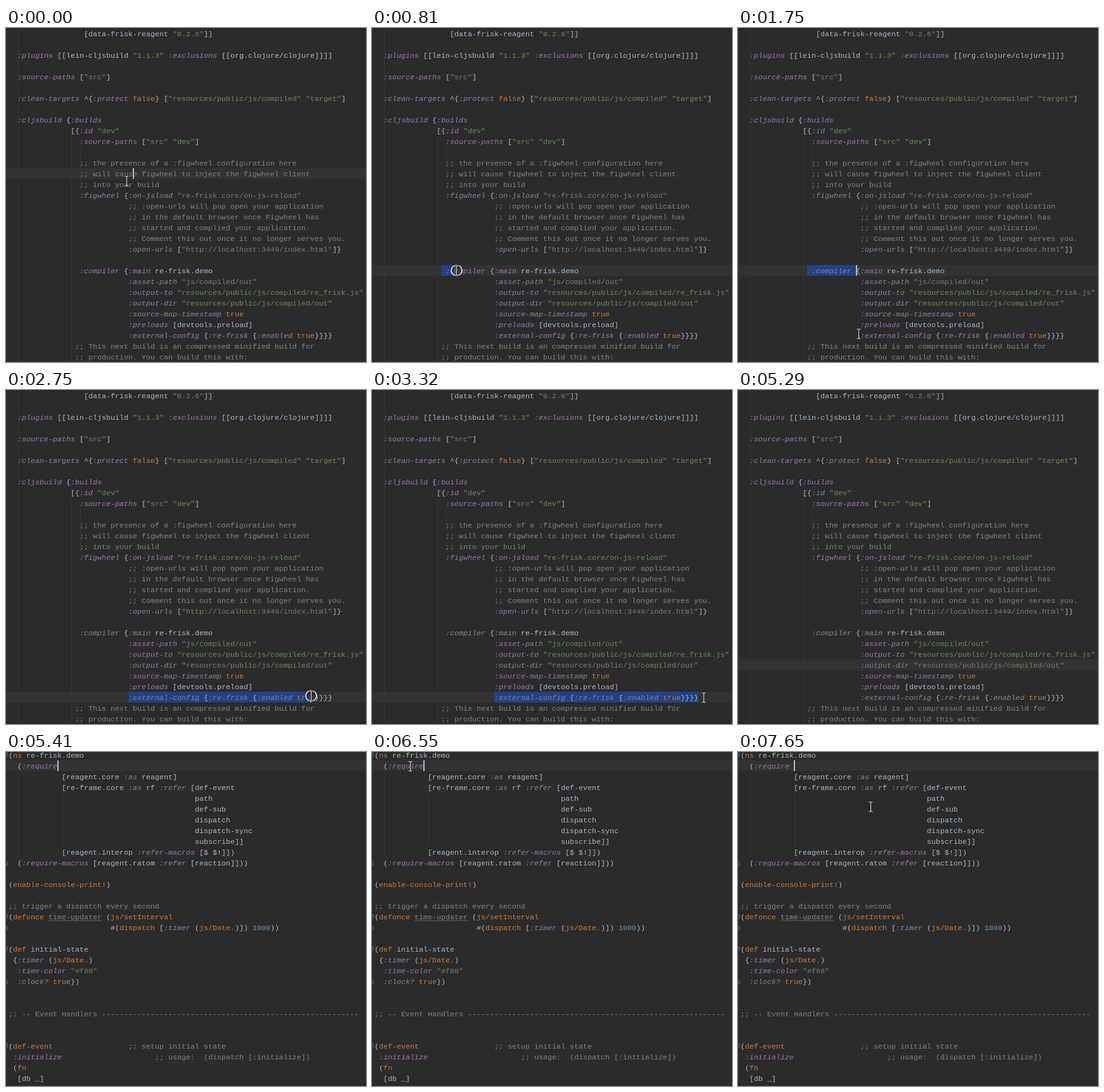
Recreate the animation shown at these times as an HTML page. Size 568 by 527 pixels, loop 8000 ms.

```html
<!DOCTYPE html>
<html lang="en">
<head>
<meta charset="utf-8">
<title>Editor session</title>
<style>
  html, body { margin: 0; width: 100%; height: 100%; overflow: hidden; background: #2b2b2b; }
  svg { display: block; }
  text { font: 11.665px "Liberation Mono", "DejaVu Sans Mono", monospace; fill: #a9b7c6; white-space: pre; }
  .keyword { fill: #9876aa; font-style: italic; }
  .string { fill: #6a8759; }
  .comment, .unused { fill: #808080; }
  .literal, .head { fill: #cc7832; }
  .number { fill: #6897bb; }
</style>
</head>
<body>
<svg id="stage" width="568" height="527" viewBox="0 0 568 527"></svg>
<script>
const LOOP = 8000, CHAR = 7, LINE = 17, LEFT = 4;
const PAGE_TOP = [0, -4];

const PAGES = [`                 [data-frisk-reagent "0.2.6"]]

  :plugins [[lein-cljsbuild "1.1.3" :exclusions [[org.clojure/clojure]]]]

  :source-paths ["src"]

  :clean-targets ^{:protect false} ["resources/public/js/compiled" "target"]

  :cljsbuild {:builds
              [{:id "dev"
                :source-paths ["src" "dev"]

                ;; the presence of a :figwheel configuration here
                ;; will cause figwheel to inject the figwheel client
                ;; into your build
                :figwheel {:on-jsload "re-frisk.core/on-js-reload"
                           ;; :open-urls will pop open your application
                           ;; in the default browser once Figwheel has
                           ;; started and complied your application.
                           ;; Comment this out once it no longer serves you.
                           :open-urls ["http://localhost:3449/index.html"]}

                :compiler {:main re-frisk.demo
                           :asset-path "js/compiled/out"
                           :output-to "resources/public/js/compiled/re_frisk.js"
                           :output-dir "resources/public/js/compiled/out"
                           :source-map-timestamp true
                           :preloads [devtools.preload]
                           :external-config {:re-frisk {:enabled true}}}}
               ;; This next build is an compressed minified build for
               ;; production. You can build this with:`,
`(ns re-frisk.demo
  (:require
            [reagent.core :as reagent]
            [re-frame.core :as rf :refer [def-event
                                          path
                                          def-sub
                                          dispatch
                                          dispatch-sync
                                          subscribe]]
            [reagent.interop :refer-macros [$ $!]])
  (:require-macros [reagent.ratom :refer [reaction]]))

(enable-console-print!)

;; trigger a dispatch every second
(defonce time-updater (js/setInterval
                       #(dispatch [:timer (js/Date.)]) 1000))

(def initial-state
 {:timer (js/Date.)
  :time-color "#f88"
  :clock? true})


;; -- Event Handlers ${"-".repeat(58)}


(def-event                 ;; setup initial state
 :initialize                     ;; usage:  (dispatch [:initialize])
 (fn
  [db _]`];

const TOKEN = new RegExp([
  "(?<comment>;;.*)", '(?<string>"[^"]*")', "(?<keyword>:[a-z][\\w?-]*)",
  "(?<literal>\\b(?:true|false)\\b)", "(?<head>(?<=\\()[a-z][\\w/.!-]*)",
  "(?<unused>time-updater)", "(?<number>\\b\\d+\\b)"
].join("|"), "g");

// Indent guides: column, first row, last row
const GUIDES = [
  [[2, 0, 30], [14, 10, 30], [16, 11, 14]],
  [[2, 2, 9], [12, 4, 8]]
];
const FOLD_STARTS = [0, 15, 18, 27], FOLD_ENDS = [10, 16, 21];

// Pointer path: time, x, y
const POINTER = [
  [0, 190, 241], [150, 190, 241], [700, 112, 385], [1090, 186, 374], [1210, 186, 374],
  [1750, 190, 482], [1890, 190, 482], [2050, 192, 491], [2330, 193, 486], [2750, 481, 482],
  [2870, 481, 482], [3190, 524, 486], [3320, 523, 485], [3910, 523, 485], [4430, 500, 427],
  [5710, 122, 130], [6300, 60, 22], [6830, 60, 22], [7350, 209, 86]
];
const PRESSES = [[700, 1210], [2330, 3320], [4430, 4570], [6300, 6430], [6570, 6710]];

// Editor states; a "drag" column follows the pointer, null hides the caret
const STATES = [
  { at: 0, page: 0, row: 13, col: 28 },
  { at: 700, page: 0, row: 22, col: "drag", from: 15 },
  { at: 1210, page: 0, row: 22, col: 26, from: 15 },
  { at: 2330, page: 0, row: 28, col: "drag", from: 27 },
  { at: 3320, page: 0, row: 28, col: 73, from: 27 },
  { at: 4430, page: 0, row: 25, col: 71 },
  { at: 4700, page: 0, row: 25, col: null },
  { at: 5410, page: 1, row: 1, col: 11 },
  { at: 6570, page: 1, row: 1, col: 11, from: 3 },
  { at: 6830, page: 1, row: 1, col: 11 },
  { at: 7090, page: 1, row: 1, col: 12 },
  { at: 7350, page: 1, row: 1, col: 13 },
  { at: 7650, page: 1, row: 1, col: 12 }
];

const stage = document.getElementById("stage");
const colX = col => LEFT + col * CHAR;

function set(node, attrs) {
  for (const key in attrs) node.setAttribute(key, attrs[key]);
}
function add(parent, tag, attrs = {}, content = "") {
  const node = document.createElementNS("http://www.w3.org/2000/svg", tag);
  set(node, attrs);
  node.textContent = content;
  return parent.appendChild(node);
}

function addLine(parent, line, y) {
  const put = (start, end, type) => {
    const raw = line.slice(start, end), word = raw.trim();
    if (!word) return;
    const col = start + raw.indexOf(word);
    add(parent, "text", { x: colX(col), y, class: type }, word);
  };
  let pos = 0;
  for (const match of line.matchAll(TOKEN)) {
    const type = Object.keys(match.groups).find(name => match.groups[name]);
    put(pos, match.index, "plain");
    pos = match.index + match[0].length;
    put(match.index, pos, type);
  }
  put(pos, line.length, "plain");
}

function addGutter(parent, top) {
  const marks = add(parent, "g", { fill: "none", stroke: "#606366" });
  const mark = (row, shape) =>
    add(marks, "path", { d: shape, transform: `translate(0 ${top + row * LINE})` });
  FOLD_STARTS.forEach(row => mark(row, "M-1 5.5H2.5V10L-1 13.5M-1 8.5H1"));
  FOLD_ENDS.forEach(row => mark(row, "M-1 4.5L2.5 8V12.5H-1M-1 9.5H1"));
}

add(stage, "rect", { width: 568, height: 527, fill: "#2b2b2b" });
const caretRow = add(stage, "rect", { width: 568, height: LINE, fill: "#323232" });
const selection = add(stage, "rect", { height: LINE, fill: "#214283" });

const pages = PAGES.map((source, index) => {
  const group = add(stage, "g"), top = PAGE_TOP[index];
  for (const [col, first, last] of GUIDES[index]) {
    add(group, "path", {
      d: `M${colX(col) + 1.5} ${top + first * LINE}V${top + (last + 1) * LINE}`, stroke: "#373737"
    });
  }
  source.split("\n").forEach((line, row) => addLine(group, line, top + row * LINE + 13));
  return group;
});
addGutter(pages[1], PAGE_TOP[1]);
add(pages[1], "path", {
  d: `M${colX(9)} 267` + "l2 -2l2 2".repeat(21), fill: "none", stroke: "#737373", "stroke-width": 0.8
});

const caret = add(stage, "rect", { width: 2, height: LINE, fill: "#bbbbbb" });
const pointer = add(stage, "g", { fill: "none" });
const ring = add(pointer, "circle", {
  r: 8.4, fill: "#2b2b2b", "fill-opacity": 0.6, stroke: "#f4f4f4", "stroke-width": 1.4
});
const beam = "M-3 -7.5H-1L0 -6.5L1 -7.5H3M0 -6.5V6.5M-3 7.5H-1L0 6.5L1 7.5H3";
add(pointer, "path", { d: beam, stroke: "#1c1c1c", "stroke-width": 2.6 });
add(pointer, "path", { d: beam, stroke: "#e4e4e4", "stroke-width": 1.1 });

function pointerAt(time) {
  const next = POINTER.findIndex(point => point[0] > time);
  if (next < 0) return POINTER[POINTER.length - 1].slice(1);
  const [t0, x0, y0] = POINTER[next - 1], [t1, x1, y1] = POINTER[next];
  const part = (time - t0) / (t1 - t0);
  return [x0 + (x1 - x0) * part, y0 + (y1 - y0) * part];
}

const show = (node, visible) => set(node, { visibility: visible ? "visible" : "hidden" });

function render(time) {
  const state = STATES.findLast(item => item.at <= time);
  const resting = time >= 4430 && time < 5710;
  const [x, y] = resting ? [500, 427] : pointerAt(time);
  const top = PAGE_TOP[state.page] + state.row * LINE;
  const col = state.col === "drag" ? Math.min(73, Math.round((x - LEFT) / CHAR)) : state.col;
  const selected = state.from !== undefined;

  pages.forEach((page, index) => set(page, { display: index === state.page ? "inline" : "none" }));
  set(caretRow, { y: top });
  set(selection, {
    x: colX(state.from || 0), y: top,
    width: selected ? Math.max(0, (col - state.from) * CHAR) : 0
  });
  set(caret, { x: colX(col || 0), y: top });
  show(caret, col !== null && !(state.row === 28 && state.col === 73));
  set(pointer, { transform: `translate(${Math.round(x) + 0.5} ${Math.round(y) + 0.5})` });
  set(pointer, { display: time >= 4700 && time < 5710 ? "none" : "inline" });
  show(ring, PRESSES.some(([down, up]) => time >= down && time < up));
}

const start = performance.now();
function tick() {
  render((performance.now() - start) % LOOP);
  requestAnimationFrame(tick);
}
tick();
</script>
</body>
</html>
```
